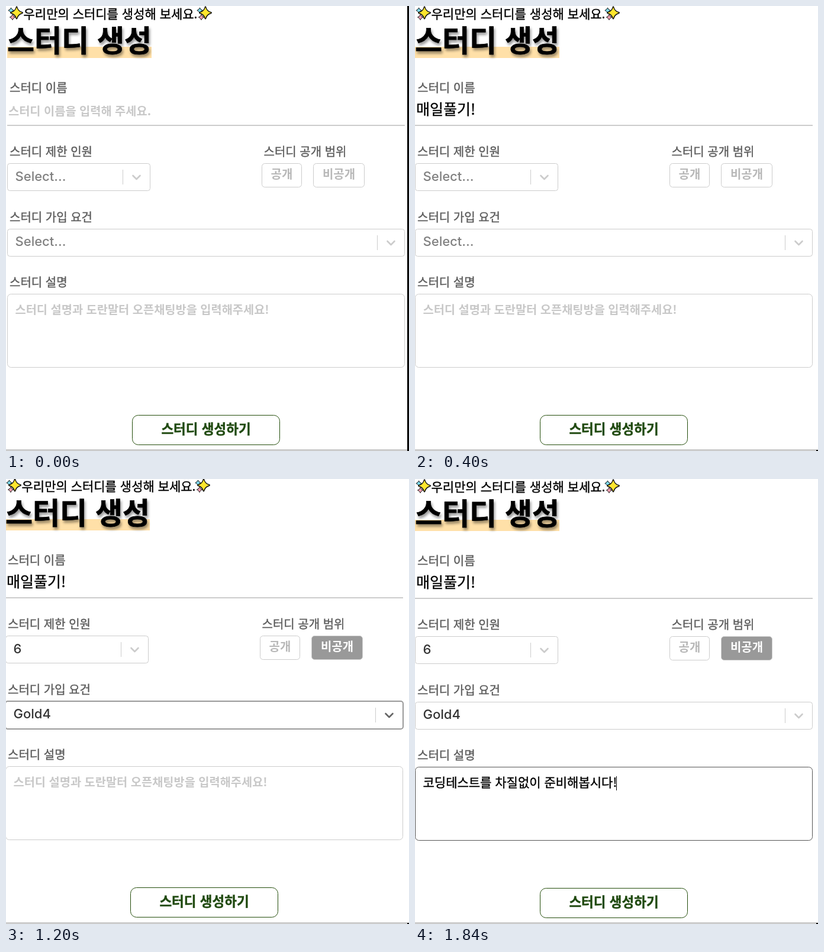
These frames come from a looping animation (681 px wide and 753 px high, 2 s). An HTML page:

```html
<!DOCTYPE html>
<html lang="ko">
<head>
<meta charset="utf-8">
<title>스터디 생성</title>
<style>
  html, body { margin: 0; width: 100%; height: 100%; overflow: hidden; background: #fff; }
  svg { display: block; }
  text { font: 400 20px "Noto Sans CJK KR", "Noto Sans CJK", sans-serif; stroke-width: .4px; }
  .label { fill: #5c5c5c; stroke: #5c5c5c; }
  .hint { font-size: 19.75px; font-weight: 700; fill: #c8c8c8; }
  .value { fill: #000; stroke: #000; }
  .select { font: 500 22px Inter, sans-serif; fill: #808080; }
  .select.chosen { fill: #333; }
  .title { font-size: 50px; font-weight: 900; stroke: #000; stroke-width: .8px;
    filter: drop-shadow(2px 4px 2px #0006); }
  .box { fill: #fff; stroke: #ccc; }
  .chevron { fill: none; stroke: #ccc; stroke-width: 2.6; stroke-linecap: round; stroke-linejoin: round; }
  .separator { stroke: #ccc; }
  .toggle text { fill: #b8b8b8; font-weight: 700; text-anchor: middle; }
  .toggle.on .box { fill: #999; }
  .toggle.on text { fill: #fff; }
  .focus .box { stroke: #999; stroke-width: 2; x: 2px; y: 377px; width: 672px; height: 47px; }
  .focus .chevron { stroke: #666; }
  .typing .box { stroke: #555; }
  .submit rect { fill: #fff; stroke: #234d0a; }
  .submit text { fill: #204a10; stroke: #204a10; font-size: 22.5px; font-weight: 700; text-anchor: middle; }
</style>
</head>
<body>
<svg width="681" height="753" viewBox="0 0 681 753">
  <defs>
    <path id="star" d="M0-10 Q2-2 10 0 Q2 2 0 10 Q-2 2-10 0 Q-2-2 0-10Z"
      stroke="#111" stroke-linejoin="round" paint-order="stroke"/>
    <g id="sparkles">
      <use href="#star" transform="translate(8.5 7.5) scale(.4)" fill="#7fe0f5" stroke-width="4"/>
      <use href="#star" transform="translate(11 19) scale(.4)" fill="#f5a3b5" stroke-width="4"/>
      <use href="#star" transform="translate(18 11.5) scale(.95)" fill="#ffe62e" stroke-width="3"/>
    </g>
    <path id="chevron" d="M-6-3 L0 3 L6-3"/>
  </defs>

  <g id="form">
    <use href="#sparkles"/>
    <use href="#sparkles" x="319"/>
    <text class="value" x="29.5" y="20.5" style="font-size:21px">우리만의 스터디를 생성해 보세요.</text>
    <rect x="2" y="69" width="244" height="19" fill="#ffe0a8"/>
    <text class="title" x="2" y="76.5">스터디 생성</text>

    <text class="label" x="6" y="145.5">스터디 이름</text>
    <text id="nameHint" class="hint" x="4" y="184.5">스터디 이름을 입력해 주세요.</text>
    <text id="nameValue" class="value" x="4" y="183.5" style="font-size:25px">매일풀기!</text>
    <rect x="2" y="201" width="672" height="2" fill="#ccc"/>

    <text class="label" x="6" y="253.5">스터디 제한 인원</text>
    <rect class="box" x="2.5" y="266.5" width="241" height="46" rx="4"/>
    <path class="separator" d="M197.5 277V302"/>
    <use class="chevron" href="#chevron" x="220.5" y="290"/>
    <text id="limit" class="select" x="15.5" y="296"></text>

    <text class="label" x="435.5" y="253.5">스터디 공개 범위</text>
    <g class="toggle">
      <rect class="box" x="432.5" y="266.5" width="67" height="40" rx="5"/>
      <text x="466" y="292">공개</text>
    </g>
    <g id="closed" class="toggle">
      <rect class="box" x="519.5" y="266.5" width="86" height="40" rx="5"/>
      <text x="562.5" y="292">비공개</text>
    </g>

    <text class="label" x="6" y="364.5">스터디 가입 요건</text>
    <g id="tierBox">
      <rect class="box" x="2.5" y="377.5" width="671" height="46" rx="4"/>
      <path class="separator" d="M627.5 388V413"/>
      <use class="chevron" href="#chevron" x="650.5" y="401"/>
    </g>
    <text id="tier" class="select" x="15.5" y="406"></text>

    <text class="label" x="6" y="474.5">스터디 설명</text>
    <g id="about">
      <rect class="box" x="2.5" y="487.5" width="671" height="124" rx="6"/>
      <text id="aboutHint" class="hint" x="15.5" y="520.5">스터디 설명과 도란말터 오픈채팅방을 입력해주세요!</text>
      <g id="aboutValue">
        <text class="value" x="15.5" y="521" style="font-size:21px">코딩테스트를 차질없이 준비해봅시다!</text>
        <path d="M342.5 503V527" stroke="#000"/>
      </g>
    </g>

    <g class="submit">
      <rect x="213.5" y="692.5" width="249" height="50" rx="10"/>
      <text x="338" y="724">스터디 생성하기</text>
    </g>
  </g>

  <rect y="750" width="678" height="3" fill="#ccc"/>
  <rect x="678" y="751" width="3" height="2"/>
  <rect id="edge" x="678" width="3" height="753"/>
</svg>
<script>
  const STEP = 400;
  const offsets = [[0, 0], [-2, 0], [-5, 0], [-3, -1], [-2, 0]];
  const $ = id => document.getElementById(id);
  const show = (id, visible) => $(id).style.display = visible ? "" : "none";

  function choose(id, value) {
    $(id).textContent = value || "Select...";
    $(id).classList.toggle("chosen", !!value);
  }

  function render(step) {
    const named = step >= 1, described = step >= 4;
    $("form").setAttribute("transform", `translate(${offsets[step]})`);
    show("edge", !named);
    show("nameHint", !named);
    show("nameValue", named);
    choose("limit", step >= 2 && "6");
    $("closed").classList.toggle("on", step >= 2);
    choose("tier", step >= 3 && "Gold4");
    $("tierBox").classList.toggle("focus", step === 3);
    $("about").classList.toggle("typing", described);
    show("aboutHint", !described);
    show("aboutValue", described);
  }

  let start, current;
  function tick(now) {
    start ??= now;
    const step = Math.floor((now - start) / STEP) % offsets.length;
    if (step !== current) render(current = step);
    requestAnimationFrame(tick);
  }
  render(current = 0);
  requestAnimationFrame(tick);
</script>
</body>
</html>
```
